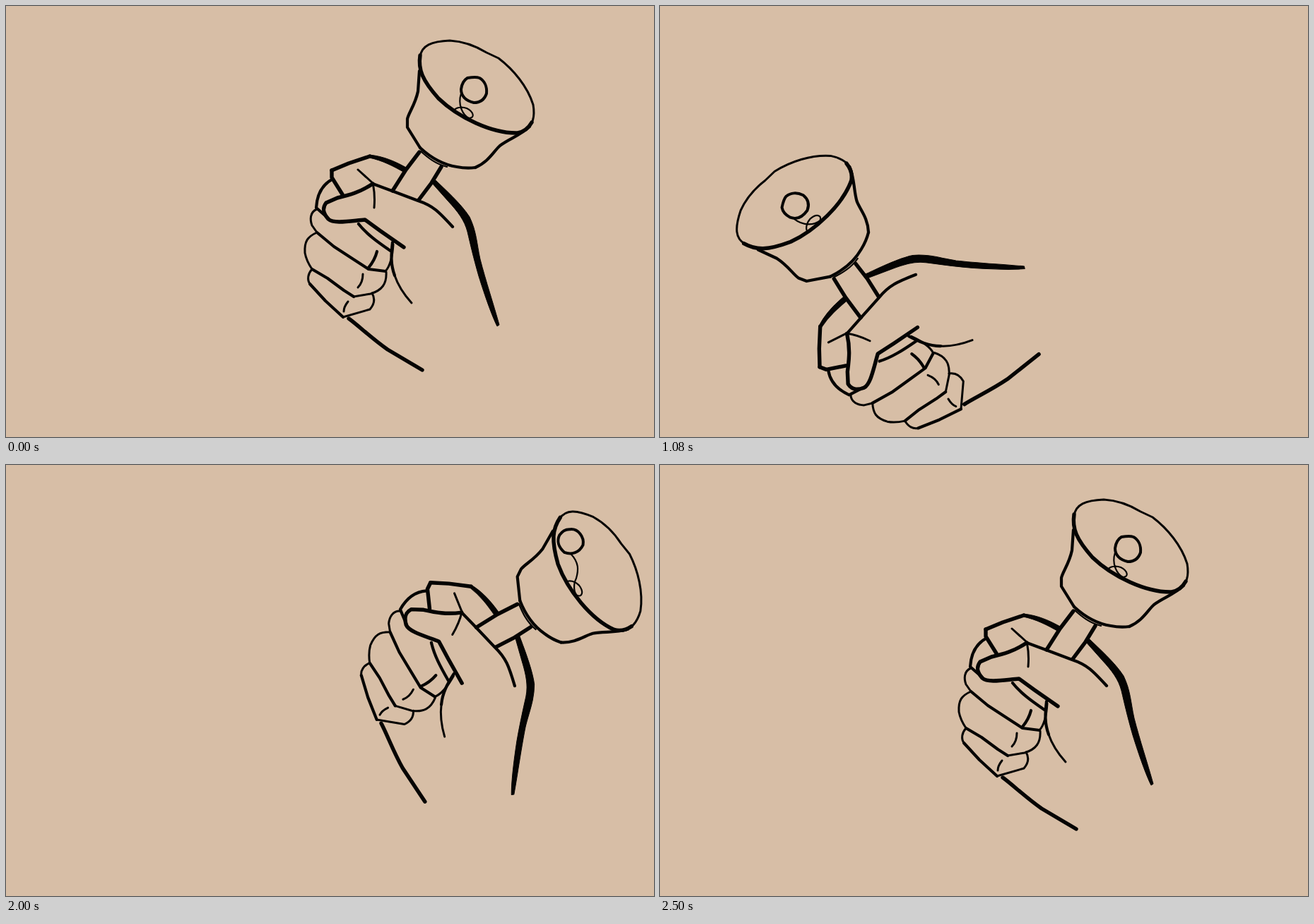
These frames come from a looping animation (917 px wide and 611 px high, 3.01 s). An HTML page:

```html
<!DOCTYPE html>
<html lang="en">
<head>
<meta charset="utf-8">
<title>Hand bell</title>
<style>
  html, body { margin: 0; width: 100%; height: 100%; overflow: hidden; background: #d7bea6; }
  svg { display: block; width: 100%; height: 100%; }
  path { fill: none; stroke: #050403; stroke-linecap: round; stroke-linejoin: round; }
  .hair path { stroke-width: 2.2; }
  .thin path { stroke-width: 3; }
  .mid path { stroke-width: 4.2; }
  .bold path { stroke-width: 5.4; }
  .ball { stroke-width: 4; }
  .solid { fill: #050403; stroke-width: 1; }
  .cover { fill: #d7bea6; stroke: none; }
  [data-part] { display: none; }
</style>
</head>
<body>
<svg viewBox="0 0 917 611">
  <g id="body">
    <!-- arm, thumb and fingers -->
    <path class="solid" d="M607 246 C620 259 644 280 656 299 C666 320 666 336 671 359 C679 390 690 423 698 452 L695 454 C688 440 678 412 669 383 C661 355 657 337 653 320 C649 304 639 291 626 277 L602 250Z"/>
    <path class="solid" d="M514 211 C535 213 552 221 568 230 L564 236 C548 227 533 219 514 215Z"/>
    <g class="bold">
      <path d="M485 443 C500 454 517 471 540 487 L589 516"/>
      <path d="M461 233 L485 223 L515 213"/>
      <path d="M461 233 L461 243 L476 267"/>
      <path d="M519 252 C501 264 486 268 469 272 L453 279 C447 287 449 294 456 302 C464 309 485 305 508 303 L530 319 L563 342"/>
      <path d="M585 207 L566 232 L547 262"/>
      <path d="M616 228 L602 251 L584 275"/>
    </g>
    <g class="mid">
      <path d="M519 252 L546 262 L583 276 C604 283 612 291 632 313"/>
      <path d="M461 246 C447 254 440 268 439 286 L456 301"/>
      <path d="M440 321 L464 341 L490 358 L513 373 L537 376"/>
      <path d="M433 373 L455 386 L478 403 L492 412"/>
      <path d="M430 394 L452 418 L477 441"/>
      <path d="M525 348 C523 356 518 365 513 371"/>
      <path d="M499 309 C510 323 525 334 544 347"/>
      <path d="M547 335 C545 352 544 366 550 382"/>
    </g>
    <g class="thin">
      <path d="M498 232 L519 251 C522 264 522 274 521 286"/>
      <path d="M440 288 C430 292 430 303 433 311 L440 321 C427 327 422 333 423 350 C425 361 429 367 433 373 C427 380 426 388 430 394"/>
      <path d="M537 376 C545 367 547 353 548 338"/>
      <path d="M492 412 L516 408 C532 403 539 394 538 377"/>
      <path d="M477 441 L515 430 C522 422 522 414 518 407"/>
      <path d="M505 380 C505 389 502 395 498 399"/>
      <path d="M484 419 C480 424 478 428 478 433"/>
      <path d="M550 382 C555 397 565 411 574 421"/>
    </g>
    <!-- bell -->
    <g class="mid">
      <path d="M585 92 L583 121 C579 140 570 151 568 160 L568 172 L586 201"/>
      <path d="M741 171 C727 184 712 188 699 198 C690 206 683 221 664 229"/>
      <path d="M586 201 C600 214 618 225 638 228 C648 230 656 230 664 229"/>
    </g>
    <g class="hair"><path d="M587 206 C597 215 608 224 624 228"/></g>

    <g data-part="rim">
      <g class="thin"><path d="M586 72 C588 56 602 50 628 49 C646 50 662 55 680 66 L697 74 C718 90 738 114 746 140 C749 158 745 168 736 176"/></g>
      <g class="bold"><path d="M586 70 C583 90 589 105 612 131 C640 158 688 181 724 180 C734 178 740 172 744 165"/></g>
    </g>
    <g data-part="rest">
      <path class="ball" d="M653 102 C659 101 665 100 670 102 C677 106 681 114 680 124 C677 133 670 137 662 137 C650 134 644 127 644 118 C645 110 648 105 653 102Z"/>
      <g class="hair"><path d="M644 124 C639 140 646 154 655 159 C664 159 662 150 652 145 C644 142 636 144 633 149"/></g>
    </g>
    <g data-part="lag">
      <path class="ball" d="M606 79 C616 73 629 80 632 91 C632 103 624 111 613 112 C602 109 596 102 596 93 C597 86 601 81 606 79Z"/>
      <g class="hair"><path d="M622 110 C638 116 642 126 644 138 C644 149 650 157 655 159 C664 159 662 150 652 145 C644 142 636 144 633 149"/></g>
    </g>
    <g data-part="bounce">
      <path class="cover" d="M733 108 L752 109 L775 121 L735 131 L733 141 C718 148 702 140 701 126 C702 112 715 106 733 108Z"/>
      <path class="ball" d="M733 109 C715 106 701 112 701 126 C702 140 718 148 730 142 C735 138 732 133 731 130"/>
      <g class="thin">
        <path d="M733 108 L752 109 L775 120"/>
        <path d="M735 114 C750 111 760 115 775 121"/>
        <path d="M731 122 L740 120 L738 124 L732 128 L752 123 L775 121"/>
        <path d="M735 130 C750 125 760 124 775 123"/>
      </g>
      <g class="hair">
        <path d="M702 118 C685 114 667 128 673 144 C678 152 682 140 677 128 C668 118 650 123 645 142"/>
        <path d="M634 150 C646 141 659 150 658 162 M645 142 C642 150 650 158 656 162"/>
      </g>
    </g>
  </g>

  <g data-part="swing">
    <g class="thin">
      <path d="M138 346 C110 342 104 318 112 295 C122 270 145 248 165 236 L180 228 C215 200 255 178 294 162"/>
      <path d="M294 162 C270 174 248 190 231 212 L240 213 C256 196 275 184 300 172"/>
      <path d="M253 217 C270 196 310 178 378 172"/>
      <path d="M253 217 L261 219 C282 199 320 183 378 172"/>
      <path d="M273 245 C288 229 305 220 326 211"/>
      <path d="M378 172 C340 184 300 202 270 232"/>
      <path d="M326 211 C310 231 290 250 275 264"/>
    </g>
    <g class="hair">
      <path d="M294 162 C318 142 345 132 372 125"/>
      <path d="M300 172 C325 160 350 154 374 150"/>
    </g>
    <g class="bold">
      <path d="M275 264 C253 290 232 309 206 325 C182 340 160 346 138 346 C121 343 112 337 110 326"/>
      <path d="M270 233 L270 245"/>
    </g>
    <path class="ball" d="M224 237 C229 235 235 233 239 234 C248 240 252 250 250 259 C246 267 238 271 231 270 C219 266 212 257 214 248C216 243 219 239 224 237Z"/>
    <g class="hair"><path d="M216 264 C215 278 222 286 230 282 C235 277 226 273 216 281 C202 288 201 304 213 307 C224 306 230 300 225 298 C212 299 203 309 207 321"/></g>
  </g>
</svg>
<script>
const LOOP = 3010;

// Where the wrist sits and how far the drawing is turned.
const poses = {
  upright:  [697, 453, 0],
  outward:  [717.5, 467.5, 25.8],
  lifted:   [549.5, 342, -60.5],
  lowered:  [516, 370.3, -69]
};

const steps = [
  [0,    'upright', 'rim rest'],
  [80,   'outward', 'rim lag'],
  [170,  'outward', 'rim rest'],
  [1000, 'lowered', 'swing'],
  [1080, 'lowered', 'rim rest'],
  [1250, 'lifted',  'rim rest'],
  [1330, 'lowered', 'rim rest'],
  [1420, 'lifted',  'rim rest'],
  [1500, 'lowered', 'rim rest'],
  [1580, 'lifted',  'rim rest'],
  [1670, 'lowered', 'rim rest'],
  [2000, 'outward', 'rim lag'],
  [2080, 'upright', 'rim bounce'],
  [2170, 'upright', 'rim rest'],
  [2250, 'outward', 'rim rest'],
  [2330, 'upright', 'rim rest'],
  [2420, 'outward', 'rim rest'],
  [2500, 'upright', 'rim rest']
];

const body = document.getElementById('body');
const parts = document.querySelectorAll('[data-part]');
let shown;

function show(step) {
  const [, pose, visible] = step;
  const [x, y, angle] = poses[pose];
  body.setAttribute('transform', `translate(${x} ${y}) rotate(${angle}) translate(-697 -453)`);
  const names = visible.split(' ');
  for (const part of parts) {
    part.style.display = names.includes(part.dataset.part) ? 'inline' : 'none';
  }
  shown = step;
}

const start = performance.now();
function tick() {
  const time = (performance.now() - start) % LOOP;
  const step = steps.findLast(([at]) => at <= time);
  if (step !== shown) show(step);
  requestAnimationFrame(tick);
}
show(steps[0]);
requestAnimationFrame(tick);
</script>
</body>
</html>
```
